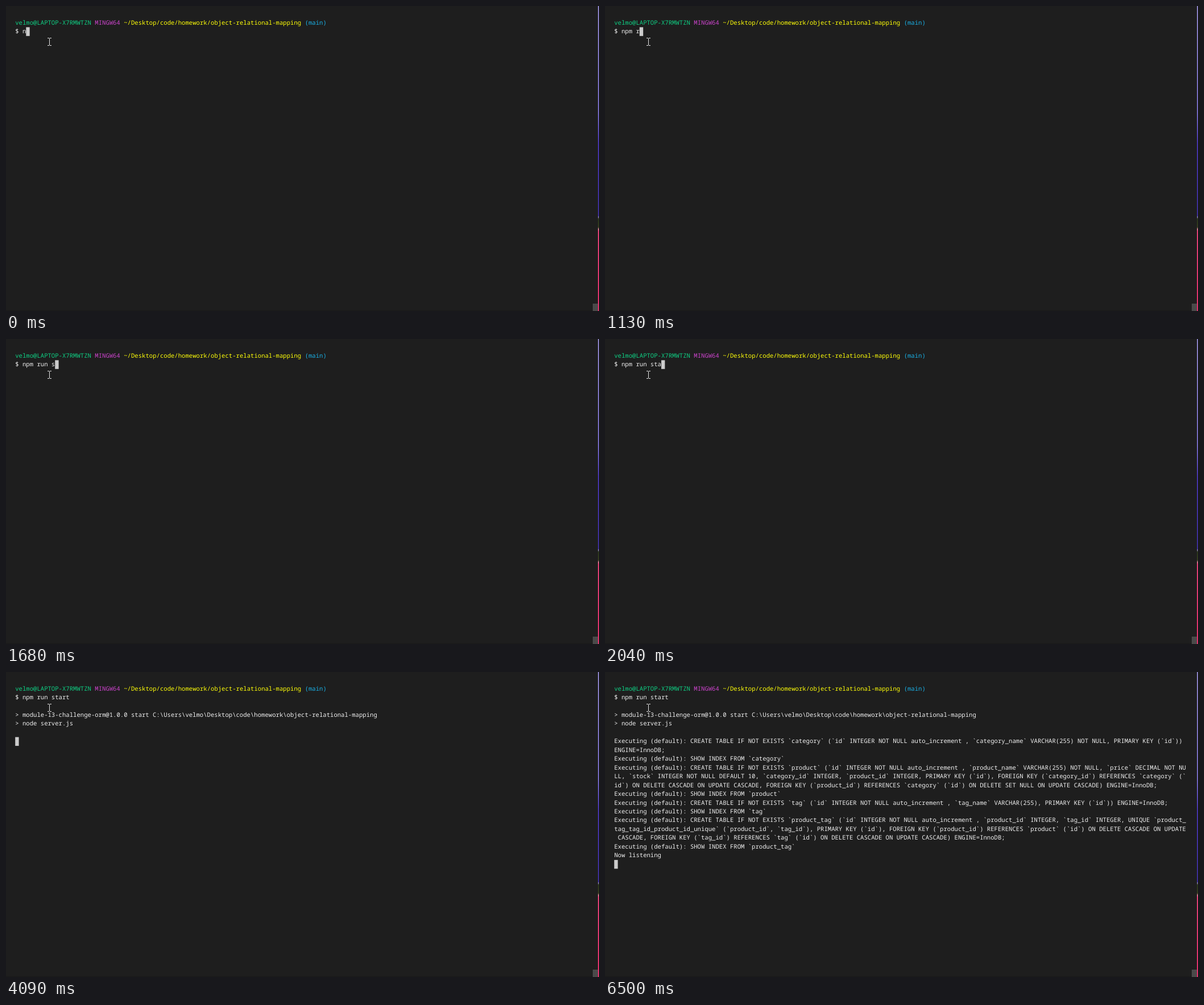
Write an HTML page with a canvas that moves like this. It is 1043 by 537 pixels and loops after 8 s.

```html
<!DOCTYPE html>
<html lang="en">
<head>
<meta charset="utf-8">
<title>Terminal session</title>
<style>
  html, body { margin: 0; width: 100%; height: 100%; overflow: hidden; background: #1e1e1e; }
  canvas { display: block; }
</style>
</head>
<body>
<canvas id="stage" width="1043" height="537"></canvas>
<script>
const LOOP = 8000;
const LEFT = 16.2, TOP = 21.9, CELL = 6.368, ROW = 15.45, BASELINE = 10.8;
const FAMILY = '"Noto Sans Mono", "DejaVu Sans Mono", monospace';
const FOREGROUND = '#f0f0f0';

const ctx = document.getElementById('stage').getContext('2d');
ctx.textRendering = 'geometricPrecision';
ctx.font = `500 100px ${FAMILY}`;
const fontSize = CELL * 100 / ctx.measureText('0').width;

const prompt = [
  ['velmo@LAPTOP-X7RMWTZN', '#0fd084'],
  ['MINGW64', '#cc44cc'],
  ['~/Desktop/code/homework/object-relational-mapping', '#ffff08'],
  ['(main)', '#1ab2e8'],
];

const command = 'npm run start';
// Time at which each character after the first is typed.
const keyTimes = [150, 430, 580, 1130, 1250, 1400, 1530, 1680, 1800, 1930, 2050, 2170];
const enterTime = 2880;

// Each block of output starts at a given terminal row.
const output = [
  { time: 4090, row: 3, lines: [
    '> module-13-challenge-orm@1.0.0 start C:\\Users\\velmo\\Desktop\\code\\homework\\object-relational-mapping',
    '> node server.js',
    '',
  ] },
  { time: 6350, row: 6, lines: [
    'Executing (default): CREATE TABLE IF NOT EXISTS `category` (`id` INTEGER NOT NULL auto_increment , `category_name` VARCHAR(255) NOT NULL, PRIMARY KEY (`id`))',
    'ENGINE=InnoDB;',
    'Executing (default): SHOW INDEX FROM `category`',
    'Executing (default): CREATE TABLE IF NOT EXISTS `product` (`id` INTEGER NOT NULL auto_increment , `product_name` VARCHAR(255) NOT NULL, `price` DECIMAL NOT NU',
    'LL, `stock` INTEGER NOT NULL DEFAULT 10, `category_id` INTEGER, `product_id` INTEGER, PRIMARY KEY (`id`), FOREIGN KEY (`category_id`) REFERENCES `category` (`',
    'id`) ON DELETE CASCADE ON UPDATE CASCADE, FOREIGN KEY (`product_id`) REFERENCES `category` (`id`) ON DELETE SET NULL ON UPDATE CASCADE) ENGINE=InnoDB;',
    'Executing (default): SHOW INDEX FROM `product`',
  ] },
  { time: 6500, row: 13, lines: [
    'Executing (default): CREATE TABLE IF NOT EXISTS `tag` (`id` INTEGER NOT NULL auto_increment , `tag_name` VARCHAR(255), PRIMARY KEY (`id`)) ENGINE=InnoDB;',
    'Executing (default): SHOW INDEX FROM `tag`',
    'Executing (default): CREATE TABLE IF NOT EXISTS `product_tag` (`id` INTEGER NOT NULL auto_increment , `product_id` INTEGER, `tag_id` INTEGER, UNIQUE `product_',
    'tag_tag_id_product_id_unique` (`product_id`, `tag_id`), PRIMARY KEY (`id`), FOREIGN KEY (`product_id`) REFERENCES `product` (`id`) ON DELETE CASCADE ON UPDATE',
    ' CASCADE, FOREIGN KEY (`tag_id`) REFERENCES `tag` (`id`) ON DELETE CASCADE ON UPDATE CASCADE) ENGINE=InnoDB;',
    'Executing (default): SHOW INDEX FROM `product_tag`',
    'Now listening',
  ] },
];

const edge = ctx.createLinearGradient(0, 0, 0, 537);
edge.addColorStop(0, '#9a90dc');
edge.addColorStop(0.35, '#8074d8');
edge.addColorStop(0.45, '#4c38c0');
edge.addColorStop(0.688, '#4030a8');
edge.addColorStop(0.692, '#8a80b0');
edge.addColorStop(0.698, '#2c3a1c');
edge.addColorStop(0.725, '#38421f');
edge.addColorStop(0.732, '#e88aa0');
edge.addColorStop(0.738, '#ff4583');
edge.addColorStop(1, '#ff3377');

function rect(x, y, w, h, color) {
  ctx.fillStyle = color;
  ctx.fillRect(x, y, w, h);
}

function write(text, col, row, color = FOREGROUND) {
  ctx.fillStyle = color;
  ctx.fillText(text, LEFT + col * CELL, Math.round(TOP + row * ROW + BASELINE));
}

function drawCursor(col, row) {
  rect(LEFT + col * CELL, TOP + row * ROW, CELL, ROW, '#cccccc');
}

function drawPointer() {
  const color = '#e6e6e6';
  rect(76, 57, 1, 12, color);
  for (const y of [56, 69]) {
    rect(73, y, 3, 1, color);
    rect(77, y, 3, 1, color);
  }
}

function draw(t) {
  rect(0, 0, 1043, 537, '#1e1e1e');
  rect(0, 536, 1032, 1, '#191919');
  rect(1032, 524, 9, 13, '#4a4a4a');
  rect(1041.3, 0, 1.7, 537, edge);

  ctx.font = `500 ${fontSize}px ${FAMILY}`;
  let col = 0;
  for (const [text, color] of prompt) {
    write(text, col, 0, color);
    col += text.length + 1;
  }

  const typed = 1 + keyTimes.filter(time => t >= time).length;
  write('$ ' + command.slice(0, typed), 0, 1);

  let cursor = t < enterTime ? [typed + 2, 1] : [0, 2];
  for (const { time, row, lines } of output) {
    if (t < time) break;
    lines.forEach((line, i) => write(line, 0, row + i));
    cursor = [0, row + lines.length];
  }
  drawCursor(...cursor);
  drawPointer();
}

const start = performance.now();
function tick() {
  draw((performance.now() - start) % LOOP);
  requestAnimationFrame(tick);
}
tick();
</script>
</body>
</html>
```
